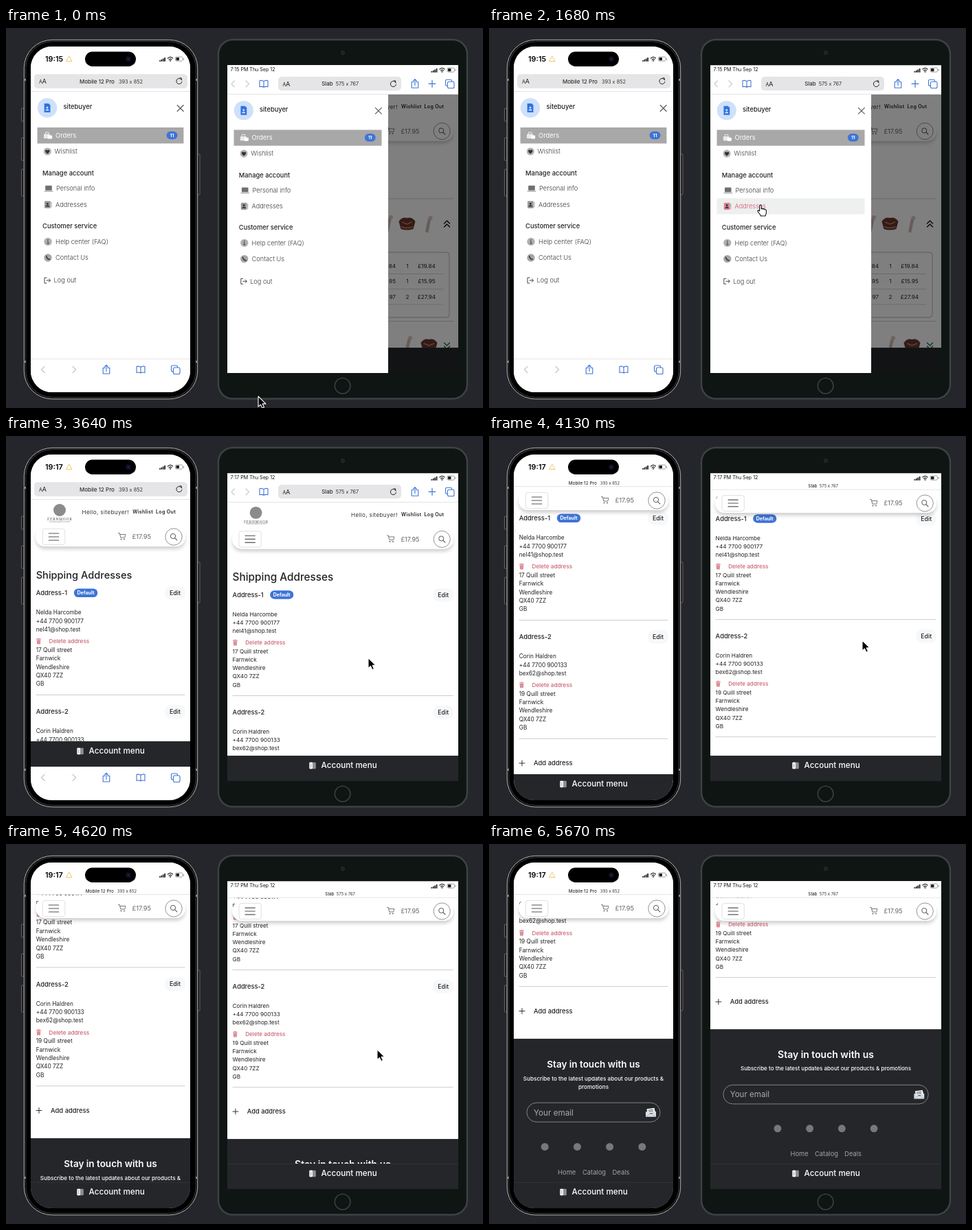
These frames come from a looping animation (694x554 px, 6300 ms). An HTML page:

```html
<!DOCTYPE html>
<html lang="en">
<head>
<meta charset="utf-8">
<title>Account menu demo</title>
<style>
html, body { margin: 0; width: 100%; height: 100%; overflow: hidden; background: #25262b; }
svg { display: block; width: 694px; height: 554px; font-family: Inter, sans-serif; }
text { white-space: pre; }
.item { color: #6f6f6f; }
.item text { fill: #3c3c3c; }
.item.on, .item.on text { color: #d4566e; fill: #d4566e; }
.hl { fill: none; }
.item.on .hl { fill: #eeefef; }
</style>
</head>
<body>
<svg id="stage" viewBox="0 0 694 554"></svg>
<script>
const LOOP = 6300, STEP = 70, DARK = '#25262a', BLUE = '#3f74d6', PINK = '#cb6273';

// y is the middle of the capitals
const text = (x, y, s, size, { w = 400, c = '#222', a = 'start', sp = 0, f = '' } = {}) =>
  `<text x="${x}" y="${y + size * .36}" font-size="${size}" font-weight="${w}" fill="${c}"
    text-anchor="${a}" letter-spacing="${sp}" ${f && `font-family="${f}"`}>${s}</text>`;
const rect = (x, y, w, h, fill, rx = 0, extra = '') =>
  `<rect x="${x}" y="${y}" width="${w}" height="${h}" rx="${rx}" fill="${fill}" ${extra}/>`;
const circle = (x, y, r, fill, extra = '') => `<circle cx="${x}" cy="${y}" r="${r}" fill="${fill}" ${extra}/>`;
const line = (d, c, sw = 1, fill = 'none') =>
  `<path d="${d}" fill="${fill}" stroke="${c}" stroke-width="${sw}" stroke-linecap="round" stroke-linejoin="round"/>`;
const solid = (d, c) => `<path d="${d}" fill="${c}"/>`;
const at = (x, y, inner, k = 1) => `<g transform="translate(${x} ${y}) scale(${k})">${inner}</g>`;
const group = (id, inner) => `<g id="${id}">${inner}</g>`;

const icon = {
  back: line('M2-4.5-2.5 0 2 4.5', '#c4c6ca', 1.2),
  forward: line('M-2-4.5 2.5 0-2 4.5', '#c4c6ca', 1.2),
  share: line('M-2-2.5H-4.8V6H4.8V-2.5H2M0 2.5V-6.5M-2.6-4 0-6.6 2.6-4', BLUE, 1.1),
  book: line('M0-3.5C-2-5.2-4-5.2-6-4.5V4.5C-4 3.8-2 3.8 0 5 2 3.8 4 3.8 6 4.5V-4.5C4-5.2 2-5.2 0-3.5V5', BLUE, 1.1),
  tabs: rect(-6.5, -6, 9, 9, 'none', 2, `stroke="${BLUE}" stroke-width="1.1"`) +
    rect(-3.5, -3, 9.5, 9.5, '#fff', 2, `stroke="${BLUE}" stroke-width="1.1"`),
  plus: line('M-5 0H5M0-5V5', BLUE, 1.2),
  reload: line('M3.8-1.5A4.1 4.1 0 1 0 4 1M1-4.6H3.2V-2', '#222', 1),
  cart: line('M-5.5-5H-3.7L-2.2 1.5H3.8L5-3H-3.2', '#6a6a6a', .9) + circle(-1.5, 4, 1, '#6a6a6a') + circle(3, 4, 1, '#6a6a6a'),
  search: circle(0, 0, 12.2, 'none', 'stroke="#868686" stroke-width=".9"') +
    circle(-1, -1, 3.6, 'none', 'stroke="#555" stroke-width="1"') + line('M1.8 1.8 4.8 4.8', '#555', 1.1),
  trash: solid('M-4-4H4V-2.8H-4ZM-1.5-5H1.5V-4H-1.5ZM-3.2-2.2H3.2L2.7 4.8H-2.7Z', '#dd8f9a'),
  close: line('M-4.5-4.5 4.5 4.5M4.5-4.5-4.5 4.5', '#555', 1.1),
  avatar: circle(0, 0, 14.2, '#cfe0fb') + solid('M-4.3-6.5H2L4.5-4V6.5H-4.3Z', '#2f72df') +
    circle(0, -.5, 1.5, '#cfe0fb') + solid('M-2.5 4C-2.5 1 2.5 1 2.5 4Z', '#cfe0fb'),
  orders: rect(-6, -2, 9, 6.5, '#e9e9e9', 1) + line('M-3.5-2V-4.5H1V-2', '#e9e9e9') + rect(0, 0, 6.2, 5, '#fff', 1),
  heart: circle(0, 0, 5.6, '#b4b4b4') + solid('M0 3.4C-6-.8-2-4.4 0-1.6 2-4.4 6-.8 0 3.4Z', '#333'),
  laptop: rect(-4.8, -4.2, 9.6, 7, 'currentColor', .8) + rect(-6.5, 3.2, 13, 1.5, '#aaa', .7),
  contacts: rect(-5, -5.2, 8.8, 10.4, 'currentColor', 1.2, 'opacity=".7"') + circle(-.6, -1.3, 1.5, '#333') +
    solid('M-3.4 3C-3.4 0 2.2 0 2.2 3Z', '#333') + line('M5-3.5V-2M5-.7V.7M5 2V3.5', '#999', 1.1),
  help: circle(0, 0, 5.7, '#b0b0b0') + line('M-.8-.8H.2V2.6M-1.2 2.6H1.4', '#444', 1) + circle(0, -2.8, .8, '#444'),
  phone: circle(0, 0, 5.7, '#a6a6a6') + line('M-2.2-2.4C-2.2 0 0 2.3 2.4 2.3', '#333', 1.6),
  exit: line('M-1-4H-4V4H-1M-1 0H4.5M2.3-2.2 4.6 0 2.3 2.2', '#444', 1),
  panel: rect(-4.6, -4.8, 9.4, 9.6, '#8d8e90', 1.4) + rect(-4.6, -4.8, 4.6, 9.6, '#fff', 1.2) +
    line('M-3-2H-1.8M-3 0H-1.8M-3 2H-1.8', '#666', .7),
  mail: solid('M-6-5 5-6.5 6.5 0-5 2Z', '#f4f4f4') + line('M-3.5-3 3-3.8M-3-1 3-1.8', '#555', .9) +
    solid('M-7.5-1.5 0 2.5 7.5-1.5V6.5H-7.5Z', '#d9e0e8') + line('M-7 6-1 2M7 6 1 2', '#93a4b5', .7),
  crown: solid('M-12-4Q-7-11 0-9 7-11 12-4L9 7Q0 10-9 7Z', '#6a3430') + line('M-8 4Q0 7 8 4M-7-3 0 0 7-3', '#b08a5a', 1.4),
  doll: line('M1-8-1 0-3 10', '#cdb9b0', 4.5) + circle(2, -9, 3, '#d8c8c0'),
};

const status = (x, y) => [0, 1, 2, 3].map(i => rect(x + i * 2.4, y + 2 - i * 1.3, 1.8, 1.8 + i * 1.3, '#222', .4)).join('') +
  line(`M${x + 12.5} ${y - 1}q3.5-3.2 7 0M${x + 14.2} ${y + 1}q1.8-1.6 3.6 0`, '#222', 1.2) + circle(x + 16, y + 2.8, 1, '#222') +
  rect(x + 23.5, y - 3, 10.5, 6.2, '#fff', 1.8, 'stroke="#888" stroke-width=".8"') + rect(x + 24.5, y - 2, 4.5, 4.2, '#222', .8) +
  rect(x + 35, y - 1, 1, 2.4, '#888', .5);

const menuItems = [
  [87, 34.5, 'Wishlist', 'heart', 24.3], [141, 37, 'Personal info', 'laptop', 26], [164.5, 36, 'Addresses', 'contacts', 25],
  [218.5, 36, 'Help center (FAQ)', 'help', 25], [242, 36, 'Contact Us', 'phone', 25], [275, 33.5, 'Log out', 'exit', 24],
];
const menuItem = ([y, x, label, name, iconX], w) =>
  `<g class="item"><rect class="hl" x="9.6" y="${y - 11.7}" width="${w - 19.2}" height="23.4"/>` +
  at(iconX, y, icon[name]) + text(x, y, label, 9.3, { w: 300 }) + '</g>';
const menu = w => rect(0, 0, w, 420, '#fff') + at(24, 23.5, icon.avatar) +
  text(47.5, 22, 'sitebuyer', 9.4, { w: 500 }) + at(w - 14.3, 24, icon.close) +
  rect(9.6, 52, w - 19.2, 23.4, '#a8a8a8') + at(25, 63.5, icon.orders) + text(36, 63.5, 'Orders', 9.4, { c: '#fff' }) +
  rect(w - 34.5, 57.7, 16, 11.6, BLUE, 5.8) + text(w - 26.5, 63.5, '11', 6.8, { w: 700, c: '#fff', a: 'middle' }) +
  text(17, 118.7, 'Manage account', 9.4, { w: 500 }) + text(17, 196, 'Customer service', 9.4, { w: 500 }) +
  menuItems.map(item => menuItem(item, w)).join('');

const header = w => circle(42, 15, 9, '#8b8b8b') +
  text(42.3, 28, 'FERNMOOR', 5.4, { c: '#555', a: 'middle', sp: .7, f: 'Noto Serif, serif' }) +
  text(42.3, 32, 'fine goods and gifts for the home', 1.9, { c: '#777', a: 'middle' }) +
  text(w - 89, 18.5, 'Hello, sitebuyer!', 8.2, { a: 'end', sp: .35, c: '#333' }) +
  text(w - 54, 17.5, 'Wishlist', 7.1, { w: 600, a: 'end', sp: .3 }) + text(w - 21, 17.5, 'Log Out', 7.1, { w: 600, a: 'end', sp: .3 });

const nav = w => rect(7.2, -14.5, w - 14.4, 28.6, '#fff', 14, 'filter="url(#shade)"') +
  rect(17.2, -11.7, 32.6, 23.4, '#fff', 3.5, 'stroke="#dcdde0" stroke-width=".9"') +
  line('M26.3-5H40.7M26.3 0H40.7M26.3 5H40.7', '#555', 1.2) + at(w - 99, -.5, icon.cart) +
  text(w - 57, 0, '£17.95', 9.3, { c: '#666', a: 'end' }) + at(w - 24, 0, icon.search);

const people = [
  ['Nelda Harcombe', '+44 7700 900177', 'nel41@shop.test', '17 Quill street'],
  ['Corin Haldren', '+44 7700 900133', 'bex62@shop.test', '19 Quill street'],
];
const address = ([name, tel, mail, street], i, w) => {
  const rows = (list, y) => list.map((s, n) => text(7.7, y + n * 12.35, s, 8.3)).join('');
  const badge = i ? '' : rect(62.8, -6.5, 34.5, 12.6, BLUE, 6.3) + text(80, -.2, 'Default', 7.1, { w: 700, c: '#fff', a: 'middle' });
  return at(0, 136 + i * 172.8, text(7.7, 0, `Address-${i + 1}`, 9.4, { w: 500 }) + badge +
    rect(w - 37, -10, 30, 20, '#f6f8fa', 9) + text(w - 22, 0, 'Edit', 8.8, { w: 500, a: 'middle' }) +
    rows([name, tel, mail], 28.5) + at(11.5, 70.2, icon.trash, .9) +
    text(26.5, 70.3, 'Delete address', 8.2, { w: 500, c: PINK }) +
    rows([street, 'Farnwick', 'Wendleshire', 'QX40 7ZZ', 'GB'], 83) + rect(7.5, 148, w - 15, .9, '#c8c8ca'));
};

const footer = (w, size, wide) => {
  const mid = w / 2, up = wide ? 11.3 : 0, light = { w: 500, c: '#fff', a: 'middle' };
  const lines = wide ? ['Subscribe to the latest updates about our products &amp; promotions']
    : ['Subscribe to the latest updates about our products &amp;', 'promotions'];
  return rect(0, 0, w, 300, DARK) + text(mid, 37, 'Stay in touch with us', size, { ...light, w: 600 }) +
    lines.map((s, i) => text(mid, 58 + i * 12.3, s, 8.15, light)).join('') +
    at(0, -up, rect(19, 93.3, w - 38, 28, 'none', 14, 'stroke="#8c8d90" stroke-width=".9"') +
      text(29, 107.5, 'Your email', 11.7, { c: '#a9aaac' }) + at(w - 32.5, 107.3, icon.mail) +
      [-1.5, -.5, .5, 1.5].map(n => circle(mid + n * 47.2, 157.5, 5.5, '#77787b')).join('') +
      [['Home', -38.8], ['Catalog', 1], ['Deals', 40]].map(([s, x]) =>
        text(mid + x, 194.5, s, 9.4, { c: '#a3a4a6', a: 'middle' })).join(''));
};

const addresses = (w, h2, h3, wide) => text(7.7, 109.7, 'Shipping Addresses', h2, { w: 500 }) +
  people.map((p, i) => address(p, i, w)).join('') + line('M8 493H16M12 489V497', '#333', 1) +
  text(29, 493, 'Add address', 9.4, { w: 500 }) + at(0, 533.4, footer(w, h3, wide));

const orderList = () => {
  const rows = [['84', 1, '£19.84'], ['95', 1, '£15.95'], ['97', 2, '£27.94']];
  return rect(329, 248.5, 322, .9, '#ccc') + rect(329, 427, 322, .9, '#ccc') +
    at(558, 285, icon.doll) + at(583.5, 286, icon.crown) + at(615.5, 286, icon.doll) + line('M637.5 285l4-4 4 4M637.5 290l4-4 4 4', '#111', 1.4) +
    rect(335, 327, 310, 95, 'none', 4, 'stroke="#bbb"') +
    rows.map(([a, n, sum], i) => text(567, 347 + i * 22.3, a, 8.2, { a: 'end' }) + text(584, 347 + i * 22.3, n, 8.2, { a: 'middle' }) +
      text(612, 347 + i * 22.3, sum, 8.2, { a: 'middle' }) + rect(345, 358 + i * 22.3, 291, .8, '#ccc')).join('') +
    at(586, 461, icon.doll) + at(615.5, 463, icon.crown) + line('M637.5 459l4 4 4-4M637.5 464l4 4 4-4', '#176a52', 1.4);
};

const accountBar = (x, y, w, h) => rect(x, y, w, h, DARK) + rect(x, y, w, .8, '#34353a') +
  at(x + w / 2 - 44, y + 14.5, icon.panel) + text(x + w / 2 - 31.5, y + 14.2, 'Account menu', 11.7, { w: 500, c: '#fff' });

const devices = [
  { id: 'phone', x: 36, top: 93, w: 232, k: 1, h2: 14.6, h3: 13.5, navTop: 94, barShift: -19, label: [152.5, 77.7, -9], bottom: 48 },
  { id: 'tablet', x: 322, top: 97, w: 339.4, k: .99, h2: 15.5, h3: 14.1, navTop: 98, barShift: -18.5, label: [485.7, 81.5, -9.2], bottom: 0 },
];
const title = { phone: ['Mobile 12 Pro', '393 x 852', -45.5, 11.5], tablet: ['Slab', '575 x 767', -26.5, -6] };

const controls = {
  phone: rect(41, 67.3, 223, 20.6, '#e5e5e7', 5) + text(48, 78.5, 'A', 7) + text(52.5, 77.8, 'A', 9.4) + at(252, 77.5, icon.reload),
  tablet: rect(396, 71, 179, 20.3, '#e5e5e7', 5) + text(402.5, 82.5, 'A', 7) + text(407, 81.8, 'A', 9.4) + at(563.5, 81.5, icon.reload) +
    Object.entries({ back: 330.5, forward: 351, book: 375, share: 595, plus: 620, tabs: 646 }).map(([n, x]) => at(x, 81.3, icon[n])).join(''),
};
const clock = {
  phone: group('phoneTime', text(57, 45.2, '19:15', 10.8, { w: 600, c: '#000' })) + line('M92 41.3 96 48.6H88Z', '#f2c46b', 1) +
    rect(115, 34.5, 74, 21.5, '#000', 10.7) + circle(178, 45.3, 4, '#0d0f22') + circle(178, 45.3, 1.5, '#1d2250') + status(223, 45),
  tablet: group('tabletTime', text(326.5, 60.5, '7:15 PM Thu Sep 12', 7.1, { c: '#111' })) + status(618.5, 61),
};

function screen(d) {
  const { id, x, top, w, k } = d, phone = id === 'phone', px = w * k, [name, dims, nameX, dimsX] = title[id];
  const panelWidth = phone ? 232 : 236.4;
  return `<g clip-path="url(#${id}Clip)">` + rect(x, 27, px, 510, '#fff') +
    group(id + 'Content', group(id + 'Orders', phone ? '' : orderList()) +
      group(id + 'Page', header(w) + group(id + 'Body', addresses(w, d.h2, d.h3, !phone))) +
      group(id + 'Nav', nav(w)) +
      group(id + 'Account', phone ? accountBar(36, 445, 232, 90) : accountBar(322, 466, 336, 40))) +
    group(id + 'Menu', rect(x, top, px, 420, '#000', 0, 'opacity=".5"') + at(x, top, menu(panelWidth), k)) +
    (phone ? group('toolbar', rect(36, 482, 232, 52, '#fff') + rect(36, 482, 232, .7, '#ddd') +
      Object.entries({ back: 54, forward: 99, share: 146, book: 196, tabs: 247 }).map(([n, bx]) => at(bx, 498, icon[n])).join('')) : '') +
    group(id + 'Bar', rect(x, 0, px, top, '#fff') + rect(x, top - .7, px, .7, '#d9d9db')) +
    group(id + 'Controls', controls[id]) +
    group(id + 'Title', text(nameX, 0, name, 8, { c: '#111' }) + text(dimsX, .3, dims, 7.3, { c: '#333' })) + clock[id] + '</g>';
}

const phoneShell = [[22.5, 117, 19], [22.5, 160, 33], [22.5, 206, 39], [278.5, 184, 59]].map(([x, y, h]) =>
    rect(x, y, 3.5, h, '#1c1c1e', 1, 'stroke="#77787a" stroke-width=".8"')).join('') +
  rect(26.3, 17.3, 252.4, 523.6, '#0c0c0d', 41, 'stroke="#b4b5b7" stroke-width="1"') +
  rect(28.8, 19.8, 247.4, 518.6, '#000', 38.5, 'stroke="#626365" stroke-width=".6"') +
  [26, 276].map(x => rect(x, 74, 3, 3, '#888') + rect(x, 485, 3, 3, '#888')).join('');
const tabletShell = rect(309, 17, 362, 523.5, '#0f1513', 21, 'stroke="#3d4344" stroke-width="2.4"') +
  circle(490, 36, 2.6, '#1b2222', 'stroke="#2a3131" stroke-width=".8"') + circle(489.7, 521.7, 11.3, 'none', 'stroke="#3f4545" stroke-width="1.4"');

const stage = document.getElementById('stage');
stage.innerHTML = `<defs><clipPath id="phoneClip">${rect(36, 27, 232, 504, '#fff', 31)}</clipPath>
  <clipPath id="tabletClip">${rect(322, 54.5, 336, 448.5, '#fff')}</clipPath>
  <filter id="shade" x="-10%" y="-40%" width="120%" height="210%"><feDropShadow dx="0" dy="4" stdDeviation="2.5" flood-opacity=".18"/></filter></defs>` +
  rect(0, 0, 694, 554, '#25262b') + phoneShell + tabletShell + devices.map(screen).join('') +
  group('arrow', line('M0 0V15.2L3.5 12 5.9 17.2 8.5 16 6.2 10.9H11Z', '#fff', 1.1, '#000')) +
  group('hand', line('M-1.4 1.3C-1.4-.4 1.2-.4 1.2 1.3V6C1.5 4.7 3.8 4.8 3.8 6.3 4.2 5.3 6.2 5.5 6.2 7 6.8 6.2 8.4 6.6 8.4 8V11.5C8.4 13.5 7.2 14 7.2 16H.2C.2 14-2.4 12.4-3.8 9.4-4.6 7.8-2.8 7-1.4 9Z', '#111', 1.1, '#fff'));

const $ = id => document.getElementById(id);
const move = (id, x, y, k = 1) => $(id).setAttribute('transform', `translate(${x} ${y}) scale(${k})`);
const fade = (id, v) => $(id).setAttribute('opacity', v);
const hoverRows = [...document.querySelectorAll('#tabletMenu .item')];

// time, then values
const cursorPath = [
  [0, 367, 537], [70, 370, 526], [140, 375, 507], [210, 380, 490], [280, 382, 479], [420, 382, 479], [490, 384, 471], [630, 384, 471],
  [840, 391, 385], [980, 396, 312], [1120, 395, 258], [2660, 395, 258], [2800, 404, 325], [2940, 402, 435], [3080, 380, 505],
  [3290, 345, 541], [3430, 395, 470], [3570, 490, 360], [3640, 527, 323.5], [3710, 539, 308], [3780, 543, 301], [3850, 543, 301],
  [3920, 543, 298], [4200, 543, 298], [4550, 540, 299.5], [4900, 540, 299.5], [5110, 536, 340], [5390, 508, 470], [5600, 487, 546],
];
const scrollPath = [
  [3850, 0, 0], [3920, 22, 22], [3990, 58, 59], [4060, 88, 90], [4130, 109, 111], [4200, 128, 128], [4340, 156, 154],
  [4550, 184, 181], [4620, 197.5, 195], [4690, 262, 264], [4760, 318, 327], [4830, 342.5, 355],
];
function track(table, t) {
  const i = table.findIndex(row => row[0] > t);
  if (i < 0) return table[table.length - 1].slice(1);
  if (!i) return table[0].slice(1);
  const a = table[i - 1], b = table[i], p = (t - a[0]) / (b[0] - a[0]);
  return a.slice(1).map((v, n) => v + (b[n + 1] - v) * p);
}

function draw(t) {
  const opened = t < 1890, scrolls = track(scrollPath, t);
  const minute = opened ? 15 : 17;
  $('phoneTime').firstChild.textContent = `19:${minute}`;
  $('tabletTime').firstChild.textContent = `7:${minute} PM Thu Sep 12`;
  const shown = opened || t >= 2240 ? 1 : t < 2100 ? 0 : t < 2170 ? .4 : .75;

  devices.forEach((d, i) => {
    const { id, x, top, k } = d, s = scrolls[i], p = Math.min(1, s / 58), [lx, ly, rise] = d.label;
    fade(id + 'Content', shown);
    fade(id + 'Menu', +opened);
    fade(id + 'Orders', +opened);
    fade(id + 'Body', +!opened);
    move(id + 'Page', x, top - s, k);
    move(id + 'Nav', x, Math.max(top + 54 * k - s, d.navTop), k);
    move(id + 'Account', 0, d.bottom * p);
    move(id + 'Bar', 0, d.barShift * p);
    fade(id + 'Controls', Math.max(0, 1 - p * 1.4));
    move(id + 'Title', lx, ly + rise * p, 1 - .19 * p);
  });
  move('toolbar', 0, 50 * Math.min(1, scrolls[0] / 58));

  const [cx, cy] = track(cursorPath, t);
  let over = false;
  hoverRows.forEach((row, i) => {
    const on = opened && Math.abs(97 + menuItems[i][0] * .99 - cy) < 11.6;
    row.classList.toggle('on', on);
    over = over || on;
  });
  const visible = t <= 5600;
  fade('arrow', +(visible && !over));
  fade('hand', +(visible && over));
  move('arrow', cx, cy);
  move('hand', cx, cy, t === 1400 ? .92 : 1);
}

function tick() {
  draw(Math.floor(performance.now() % LOOP / STEP) * STEP);
  requestAnimationFrame(tick);
}
tick();
</script>
</body>
</html>
```
